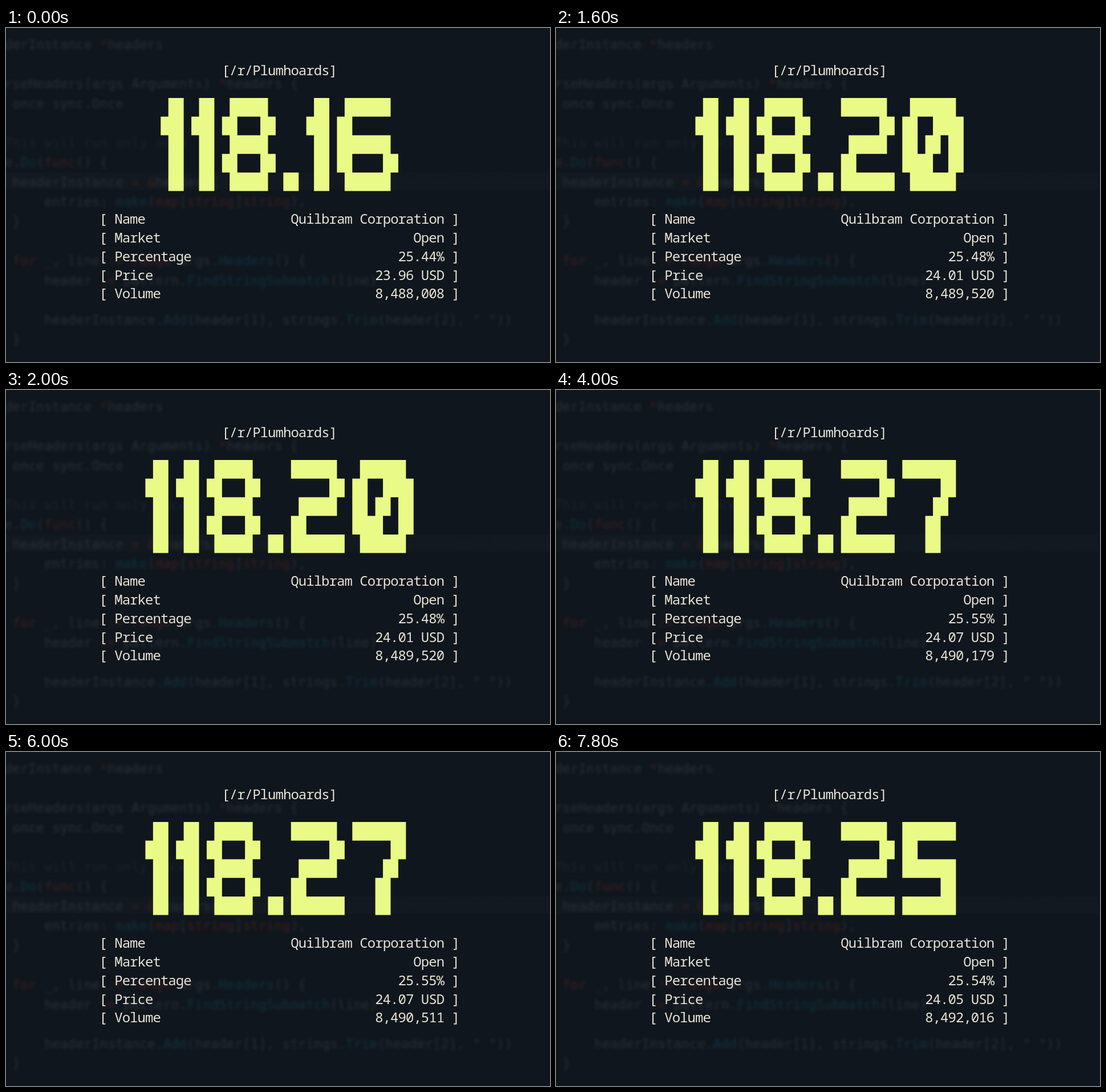
Recreate the animation shown at these times as an HTML page. Size 954 by 587 pixels, loop 8800 ms.

```html
<!DOCTYPE html>
<html lang="en">
<head>
<meta charset="utf-8">
<title>Ticker</title>
<style>
  html, body { margin: 0; height: 100%; overflow: hidden; background: #10161d; }
  svg { display: block; width: 100vw; height: 100vh; }
  text { white-space: pre; }
  #code { font: 23.12px "DejaVu Sans Mono", monospace; fill: #293037; filter: blur(2.4px); }
  .key { fill: #3a2020; }
  .call { fill: #10323e; }
  .dim { fill: #1c232a; }
  .note { fill: #151b22; }
  #rows { font: 24px "Noto Sans Mono", monospace; letter-spacing: -.95px; fill: #e8e3d5; }
  #blocks { fill: #eafa86; }
</style>
</head>
<body>
<svg viewBox="0 0 954 587">
  <rect y="254" width="954" height="30" fill="#fff" opacity=".01"/>
  <g id="code"></g>
  <path id="blocks"/>
  <g id="rows"></g>
</svg>
<script>
const LOOP = 8800, CELL = 13.44, ROW = 32.73, COLS = 71;
const $ = id => document.getElementById(id);
const colX = c => 2.5 + c * CELL;
const rowY = r => 57.5 + r * ROW;

// Start time, big number, percentage, price, volume
const states = [
  [0, "118.16", "25.44%", "23.96 USD", "8,488,008"],
  [1600, "118.20", "25.48%", "24.01 USD", "8,489,520"],
  [3600, "118.27", "25.55%", "24.07 USD", "8,490,179"],
  [5800, "118.27", "25.55%", "24.07 USD", "8,490,511"],
  [7800, "118.25", "25.54%", "24.05 USD", "8,492,016"]
];

const glyphs = {
  "0": [" ######", "##  ####", "## ## ##", "####  ##", " ######"],
  "1": [" ##", "###", " ##", " ##", " ##"],
  "2": ["######", "     ##", " #####", "##", "#######"],
  "5": ["#######", "##", "#######", "     ##", "#######"],
  "6": [" ######", "##", "#######", "##    ##", " ######"],
  "7": ["#######", "     ##", "    ##", "   ##", "   ##"],
  "8": [" #####", "##   ##", " #####", "##   ##", " #####"],
  ".": ["", "", "", "", "##"]
};

// Blurred code behind the ticker: line, indent, text, class
const code = [
  [0, 0, "var headerInstance *headers"],
  [2, 0, "func parseHeaders(args Arguments) *headers {"],
  [3, 4, "var once sync.Once"],
  [5, 4, "// This will run only once", "dim"],
  [6, 4, "once.Do(func() {"],
  [7, 8, "headerInstance = &amp;headers{"],
  [7, 38, "You, seconds ago · Uncommitted changes", "note"],
  [8, 12, "entries: make(map[string]string),"],
  [9, 8, "}"],
  [11, 8, "for _, line := range args.Headers() {"],
  [12, 12, "header := pattern.FindStringSubmatch(line)"],
  [14, 12, 'headerInstance.Add(header[1], strings.Trim(header[2], " "))'],
  [15, 8, "}"]
];
const syntax = /\b(?:Do|make|Add|Trim|Headers|FindStringSubmatch)\b|\b(?:for|func|map|string|range)\b|\*|&amp;|:?=/g;
const paint = s => s.replace(syntax, m =>
  `<tspan class="${/^(Do|make|[ATHF])/.test(m) ? "call" : "key"}">${m}</tspan>`);

$("code").innerHTML = code.map(([line, indent, s, kind = ""]) =>
  `<text x="${-100 + indent * 13.92}" y="${37 + line * 34.55}" class="${kind}">${paint(s)}</text>`
).join("");

const label = (col, row, s) =>
  `<text x="${colX(col) - .47}" y="${rowY(row) + 25}">${s}</text>`;

function blockPath(number) {
  const shapes = [...number].map(ch => glyphs[ch]);
  const widths = shapes.map(g => Math.max(...g.map(r => r.length)));
  const total = widths.reduce((a, b) => a + b + 1);
  let col = Math.floor((COLS - total) / 2), path = "";
  shapes.forEach((g, i) => {
    g.forEach((line, r) => {
      for (const run of line.matchAll(/#+/g)) {
        const left = colX(col + run.index);
        const right = colX(col + run.index + run[0].length);
        path += `M${left} ${rowY(r + 2)}H${right}V${rowY(r + 3)}H${left}Z`;
      }
    });
    col += widths[i] + 1;
  });
  return path;
}

function show([, number, percent, price, volume]) {
  const table = [
    ["Name", "Quilbram Corporation"], ["Market", "Open"],
    ["Percentage", percent], ["Price", price], ["Volume", volume]
  ];
  $("blocks").setAttribute("d", blockPath(number));
  $("rows").innerHTML = label(28, 0, "[/r/Plumhoards]") + table.map(([key, value], i) =>
    label(12, 8 + i, "[ " + key) + label(57 - value.length, 8 + i, value + " ]")).join("");
}

let current;
function frame() {
  const t = performance.now() % LOOP;
  const next = states.findLast(s => s[0] <= t);
  if (next !== current) show(current = next);
  requestAnimationFrame(frame);
}
frame();
</script>
</body>
</html>
```
